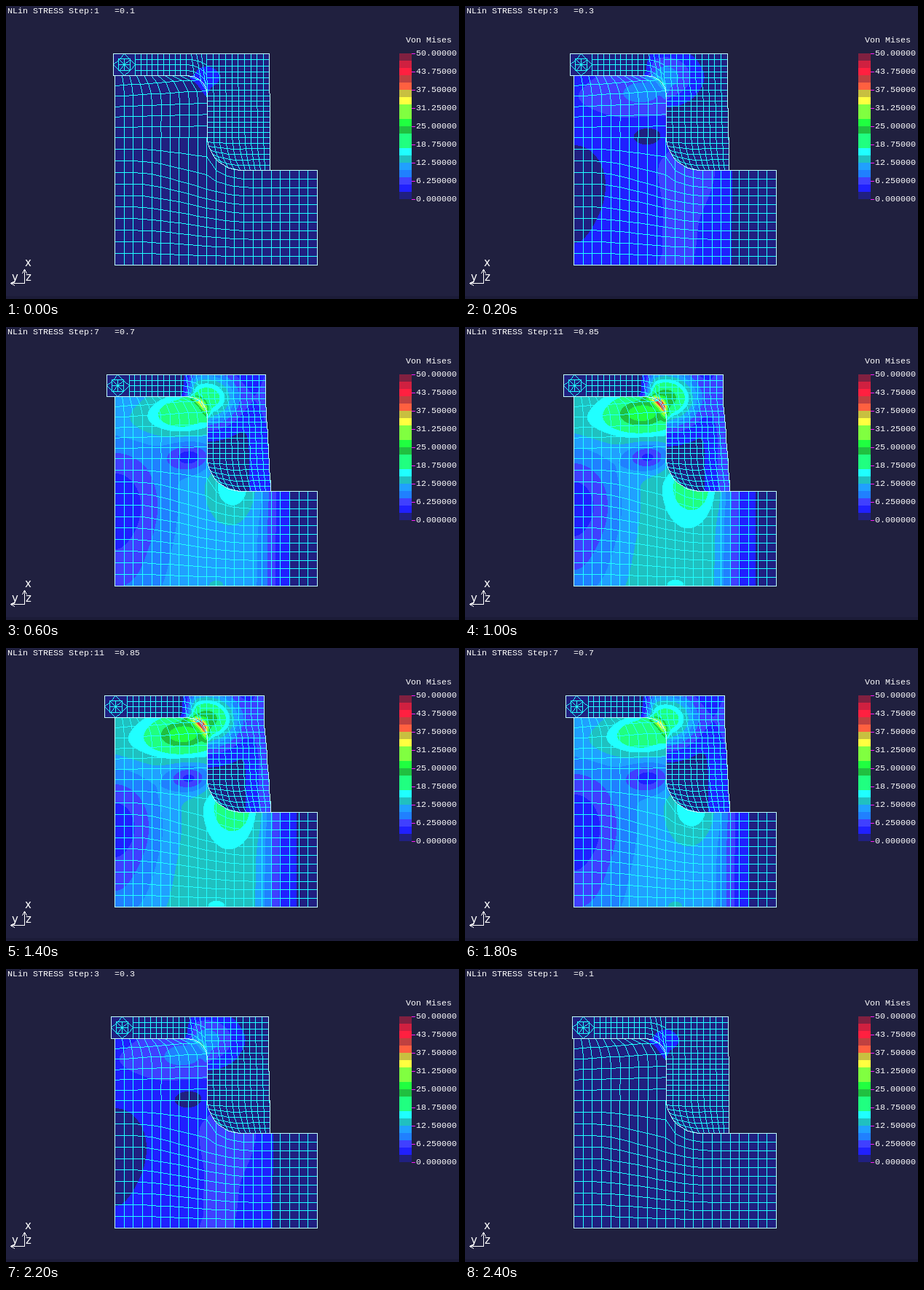
An HTML page with a canvas that plays this animation: 622x402 px, repeating every 2600 ms.

```html
<!DOCTYPE html>
<html lang="en">
<head>
<meta charset="utf-8">
<title>Von Mises stress</title>
<style>
html, body { margin: 0; width: 100%; height: 100%; overflow: hidden; background: #20203f; }
canvas { display: block; }
</style>
</head>
<body>
<canvas id="stage" width="622" height="402"></canvas>
<script>
const stage = document.getElementById('stage').getContext('2d');
const BOX = { x: 120, y: 60, w: 312, h: 300 };
const MESH = '#20ffff', EDGE = '#c0ffff', INK = '#fff';

// One colour per 2.5 units of stress, lowest first.
const BAND = 2.5;
const COLORS = ('202080 2020ff 4040ff 2080ff 20a0ff 20c0c0 20ffff 20ff80 20ff80 20c040 ' +
  '20ff40 80ff40 80ff40 ffff40 c8c040 ff6040 c04040 ff2040 d02040 802040').split(' ');
const RGB = COLORS.map(c => [0, 2, 4].map(i => parseInt(c.substr(i, 2), 16)));

// Step text, load factor, sideways shift of the top in px.
const STEPS = [
  ['1   =0.1', .1, 1], ['3   =0.3', .3, 4], ['5   =0.5', .5, 7], ['7   =0.7', .7, 10],
  ['9   =0.8', .8, 12], ['11  =0.85', .85, 13], ['13  =1', 1, 19]
];

const clamp = (v, a = 0, b = 1) => Math.min(b, Math.max(a, v));
const mix = (a, b, t) => a + (b - a) * t;
const smooth = t => (t = clamp(t), t * t * (3 - 2 * t));
const bell = t => Math.exp(-t * t);
const seg = (p, q) => t => [mix(p[0], q[0], t), mix(p[1], q[1], t)];
const arc = (cx, cy, rx, ry, a, b) => t => {
  const k = mix(a, b, t);
  return [cx + rx * Math.cos(k), cy + ry * Math.sin(k)];
};
const join = (f, g, k) => t => t < k ? f(t / k) : g((t - k) / (1 - k));
const coons = (T, B, L = seg(T(0), B(0)), R = seg(T(1), B(1))) => (u, v) => [0, 1].map(i =>
  mix(T(u)[i], B(u)[i], v) + mix(L(v)[i], R(v)[i], u) -
  mix(mix(T(0)[i], T(1)[i], u), mix(B(0)[i], B(1)[i], u), v));
const rect = (x0, y0, x1, y1) => (u, v) => [mix(x0, x1, u), mix(y0, y1, v)];
const chain = points => points.slice(1).map((p, i) => seg(points[i], p));

const fillet = arc(248, 123, 28, 28, -Math.PI / 2, 0);
const heel = arc(325, 180, 49, 45, Math.PI, Math.PI / 2);

// Stress: the bulk grows with the load, the peaks grow faster.
const blob = (x, y, cx, cy, rx, ry) => bell((x - cx) / rx) * bell((y - cy) / ry);
const ridge = (x, y) => bell((Math.hypot(x - 248, y - 123) - 27) / 5) *
  bell((Math.atan2(y - 123, x - 248) + .75) / .65);

const baseBulk = (x, y) => 2 + 11.5 / (1 + Math.exp((x - 362) / 11))
  - 10 * blob(x, y, 149, 245, 66, 82)
  - 3 * blob(x, y, 149, 345, 60, 50)
  - 9 * blob(x, y, 252, 178, 30, 19)
  + 2.5 * blob(x, y, 190, 132, 60, 26)
  + blob(x, y, 295, 300, 70, 120)
  + 1.5 * blob(x, y, 288, 354, 14, 9);
const basePeak = (x, y) => 13 * blob(x, y, 244, 117, 44, 25) +
  7 * blob(x, y, 312, 218, 32, 38) + 23 * ridge(x, y);

const hookBulk = (x, y) => 2 + 4 * smooth((x - 320) / 40) +
  23 * blob(x, y, 275, 97, 42, 34) * smooth((x - 238) / 25);
const hookPeak = (x, y) => 23 * ridge(x, y);

const sample = f => Float32Array.from({ length: BOX.w * BOX.h },
  (_, i) => f(BOX.x + i % BOX.w, BOX.y + Math.floor(i / BOX.w)));

// Rows sag from the shoulder on the left down to the heel on the right.
function baseBody(u, v) {
  const x = mix(149, 427, u);
  const heelTop = 180 + 45 * Math.sqrt(Math.max(0, 1 - ((325 - x) / 49) ** 2));
  const top = x < 276 ? 180 : x < 325 ? heelTop : 225;
  const sag = 180 + 45 * smooth((x - 170) / 165);
  return [x, mix(mix(top, sag, clamp(v * 4)), 355, v)];
}

const BASE = {
  bulk: sample(baseBulk),
  peak: sample(basePeak),
  outline: [seg([149, 95], [248, 95]), fillet, seg([276, 123], [276, 180]), heel,
    ...chain([[325, 225], [427, 225], [427, 355], [149, 355], [149, 95]])],
  patches: [
    [10, 6, coons(seg([149, 95], [248, 95]), seg([149, 180], [276, 180]), undefined,
      join(fillet, seg([276, 123], [276, 180]), .4))],
    [22, 11, baseBody]
  ]
};
const HOOK = {
  bulk: sample(hookBulk),
  peak: sample(hookPeak),
  outline: [...chain([[148, 65], [362, 65], [362, 225], [325, 225]]), t => heel(1 - t),
    seg([276, 180], [276, 123]), t => fillet(1 - t), ...chain([[248, 95], [148, 95], [148, 65]])],
  patches: [
    [2, 2, (u, v) => [163 + 15 * (u + v - 1), 80 + 15 * (v - u)]],
    [2, 2, rect(155, 72, 171, 88)],
    [1, 1, rect(148, 65, 178, 95)],
    [9, 4, rect(178, 65, 248, 95)],
    [4, 4, coons(seg([248, 65], [276, 65]), fillet)],
    [10, 7, rect(276, 65, 362, 123)],
    [10, 8, rect(276, 123, 362, 180)],
    [10, 6, coons(seg([276, 180], [362, 180]), join(t => heel(.5 + t / 2), seg([325, 225], [362, 225]), .45),
      t => heel(t / 2))]
  ]
};

const still = p => p;
const shear = shift => ([x, y]) => {
  const hold = clamp((123 - y) / 28);
  const head = .62 + .38 * (362 - x) / 214;
  const body = .62 * clamp((205 - y) / 110, -.15, 1) * Math.max(0, (x - 276) / 86);
  return [x - shift * mix(body, head, hold), y];
};

// Hard-edged line, one pixel wide.
function plot(c, p, q, color) {
  const [x0, y0, x1, y1] = [...p, ...q].map(Math.round);
  const n = Math.max(Math.abs(x1 - x0), Math.abs(y1 - y0), 1);
  c.fillStyle = color;
  for (let i = 0; i <= n; i++) c.fillRect(Math.round(mix(x0, x1, i / n)), Math.round(mix(y0, y1, i / n)), 1, 1);
}

function newCanvas(w, h) {
  const c = document.createElement('canvas');
  c.width = w;
  c.height = h;
  return c;
}

function contour({ bulk, peak }, load) {
  const tile = newCanvas(BOX.w, BOX.h), t = tile.getContext('2d');
  const img = t.createImageData(BOX.w, BOX.h);
  const k = load / .85, fast = k ** 1.3;
  bulk.forEach((b, i) => {
    const band = Math.floor((k * b + fast * peak[i]) / BAND);
    img.data.set([...RGB[clamp(band, 0, RGB.length - 1)], 255], i * 4);
  });
  t.putImageData(img, 0, 0);
  return tile;
}

function drawPart(c, part, warp, load) {
  const rim = part.outline.flatMap(f => Array.from({ length: 16 }, (_, i) => warp(f(i / 16))));
  c.save();
  c.beginPath();
  rim.forEach(p => c.lineTo(p[0] + .5, p[1] + .5));
  c.clip();
  c.drawImage(contour(part, load), BOX.x, BOX.y);
  for (const [nu, nv, f] of part.patches) {
    const node = (i, j) => warp(f(i / nu, j / nv));
    for (let i = 0; i <= nu; i++)
      for (let j = 0; j <= nv; j++) {
        if (i < nu) plot(c, node(i, j), node(i + 1, j), MESH);
        if (j < nv) plot(c, node(i, j), node(i, j + 1), MESH);
      }
  }
  c.restore();
  rim.forEach((p, i) => plot(c, p, rim[(i + 1) % rim.length], EDGE));
}

function drawLegend(c) {
  COLORS.forEach((color, i) => {
    c.fillStyle = '#' + color;
    c.fillRect(540, 255 - i * 10, 17, 10);
  });
  for (let i = 0; i <= 8; i++) {
    const y = 65 + i * 25;
    c.fillStyle = '#ff20ff';
    c.fillRect(557, y, 5, 1);
    c.fillStyle = INK;
    c.fillText((50 - 6.25 * i).toFixed(6).slice(0, 8), 563, y + 3);
  }
  c.fillText('Von Mises', 549, 50);
}

function arrow(c, x0, y0, x1, y1) {
  const n = Math.hypot(x1 - x0, y1 - y0), dx = (x1 - x0) / n, dy = (y1 - y0) / n;
  plot(c, [x0, y0], [x1, y1], INK);
  for (const s of [-3, 3]) plot(c, [x1, y1], [x1 - 5 * dx + s * dy, y1 - 5 * dy + s * dx], INK);
}

function drawAxes(c) {
  arrow(c, 25, 380, 25, 361);
  arrow(c, 25, 380, 6, 380);
  c.font = '15px "DejaVu Sans", sans-serif';
  c.fillText('x', 26, 357);
  c.fillText('y', 8, 377);
  c.fillText('z', 27, 377);
}

const views = STEPS.map(([label, load, shift]) => {
  const view = newCanvas(622, 402), c = view.getContext('2d');
  c.fillStyle = '#20203f';
  c.fillRect(0, 0, 622, 402);
  c.fillStyle = '#1c1c38';
  c.fillRect(0, 398, 622, 4);
  drawPart(c, HOOK, shear(shift), load);
  drawPart(c, BASE, still, load);
  c.font = '11.67px "Liberation Mono", monospace';
  c.fillStyle = INK;
  c.fillText('NLin STRESS Step:' + label, 2, 10);
  drawLegend(c);
  drawAxes(c);
  return view;
});

const start = performance.now();
function frame() {
  const slot = Math.floor((performance.now() - start) % 2600 / 200);
  stage.drawImage(views[6 - Math.abs(6 - slot)], 0, 0);
  requestAnimationFrame(frame);
}
frame();
</script>
</body>
</html>
```
